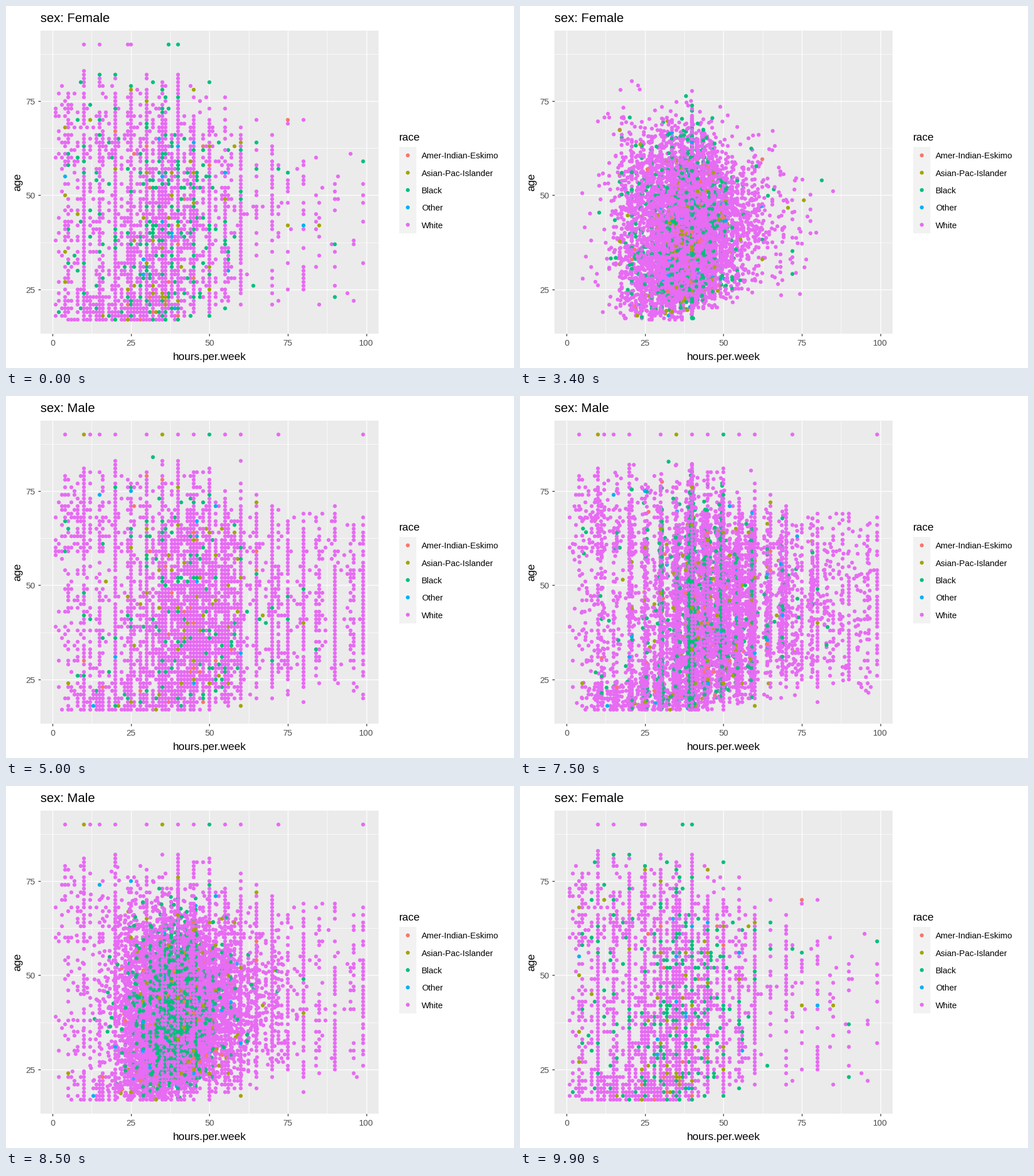
These frames come from a looping animation (885x632 px, 10 s). A matplotlib script:

```python
import matplotlib.pyplot as plt
import numpy as np
from matplotlib.animation import FuncAnimation
from matplotlib.colors import to_rgb
from matplotlib.patches import Rectangle

W, H, DPI = 885, 632, 100
FRAMES, INTERVAL = 100, 100
STEPS = 25
PT = 72 / DPI

RACES = ["Amer-Indian-Eskimo", "Asian-Pac-Islander", "Black", "Other", "White"]
COLORS = ["#F8766D", "#A3A500", "#00BF7D", "#00B0F6", "#E76BF3"]
RGB = np.array([to_rgb(c) for c in COLORS])
ASIAN, BLACK, WHITE = 1, 2, 4

# Panel edges in pixels
LEFT, RIGHT, TOP, BOTTOM = 60.2, 649.4, 43.2, 571.6
DOT = 6.8

# Weekly hours of the people at the top age
TOP_AGE = 90
FEMALE_TOP = {BLACK: [37, 40], WHITE: [10, 15, 24, 25]}
MALE_TOP = {ASIAN: [10, 35], BLACK: [50],
            WHITE: [4, 12, 15, 20, 45, 60, 72, 40, 30, 55, 99]}

rng = np.random.default_rng(11)


def px(hours):
    return 81.1 + 5.465 * np.asarray(hours)


def py(age):
    return 659.45 - 6.58 * np.asarray(age)


def hour_weights(hours):
    """Round numbers are popular, above all 40, and less so away from it."""
    near = np.exp(-np.abs(hours - 40) / 12)
    long_week = hours > 60
    return np.select(
        [hours == 40, hours == 99, hours % 10 == 0, hours % 5 == 0,
         long_week & (hours % 12 == 0), long_week,
         hours % 4 == 0, hours % 2 == 0],
        [15000, 85, 5500 * near, 2100 * near,
         50, 2 + 60 * near,
         60 + 350 * near, 25 + 200 * near],
        15 + 70 * near)


def sample_hours(race, female):
    hours = np.arange(1, 100)
    share = .14 + .45 / (1 + np.exp((hours - 39.5) / 2))
    weight = hour_weights(hours) * (share if female else 1 - share)
    usual = weight * np.exp(-np.abs(hours - 40) / 28)
    n = len(race)
    return np.where(race == WHITE,
                    rng.choice(hours, n, p=weight / weight.sum()),
                    rng.choice(hours, n, p=usual / usual.sum()))


def sample_ages(hours, female):
    """Short weeks are worked by the young and the old, long ones mid-life."""
    n = len(hours)
    old = (.5 if female else .6) * np.exp(-hours / 16) + .01
    young = .42 * np.exp(-((hours - 20) / 14) ** 2)
    a = 1.55 + .028 * np.clip(hours - 36, 0, 30)
    mid_age = 18 + 57 * rng.beta(a, 2.5)
    old_age = 59 + 26 * rng.beta(1, 2.2, n)
    young_age = 17 + 9 * rng.beta(1, 1.8, n)
    u = rng.random(n)
    return np.floor(np.select([u < old, u < old + young],
                              [old_age, young_age], mid_age))


def make_people(counts, top, female):
    race = rng.permutation(np.repeat(np.arange(5), counts))
    hours = sample_hours(race, female)
    pos = np.column_stack([hours, sample_ages(hours, female)])
    for r, top_hours in top.items():
        extra = [(h, TOP_AGE) for h in top_hours]
        pos = np.vstack([pos, extra])
        race = np.append(race, np.full(len(extra), r))
    return pos, race


def pair_up(race_a, race_b):
    """Index in b of the k-th person of the same race, or -1."""
    partner = np.full(len(race_a), -1)
    for r in range(5):
        ia, ib = np.flatnonzero(race_a == r), np.flatnonzero(race_b == r)
        n = min(len(ia), len(ib))
        partner[ia[:n]] = ib[:n]
    return partner


F_POS, F_RACE = make_people([119, 346, 1553, 109, 8638], FEMALE_TOP, True)
M_POS, M_RACE = make_people([192, 691, 1568, 162, 19163], MALE_TOP, False)
F_TO_M = pair_up(F_RACE, M_RACE)
M_TO_F = pair_up(M_RACE, F_RACE)


def top_only(pos, race):
    """Drop points fully hidden by a later one at the same place."""
    key = pos[::-1, 0] + 1j * pos[::-1, 1]
    first = np.unique(key.round(4), return_index=True)[1]
    keep = np.sort(len(pos) - 1 - first)
    return pos[keep], race[keep]


def move(pos, race, partner, goal, t):
    """Paired people glide to their partner's place; the rest wait."""
    end = np.where((partner >= 0)[:, None], goal[partner], pos)
    return top_only(pos + t * (end - pos), race)


F_STILL = top_only(F_POS, F_RACE)
M_STILL = top_only(M_POS, M_RACE)


def people_at(n):
    if 26 <= n < 50:
        return move(F_POS, F_RACE, F_TO_M, M_POS, (n - 25) / STEPS)
    if 50 <= n < 75:
        return M_STILL
    if 75 <= n < 99:
        return move(M_POS, M_RACE, M_TO_F, F_POS, (n - 74) / STEPS)
    return F_STILL


plt.rcParams["font.family"] = "Liberation Sans"
fig = plt.figure(figsize=(W / DPI, H / DPI), dpi=DPI, facecolor="white")
ax = fig.add_axes([0, 0, 1, 1])
ax.set_xlim(0, W)
ax.set_ylim(H, 0)
ax.axis("off")


def label(x, y, s, size, color="black", **kw):
    return ax.text(x, y, s, fontsize=size * PT, color=color,
                   va="baseline", **kw)


def line(xs, ys, width, color="white"):
    ax.plot(xs, ys, color=color, lw=width * PT, solid_capstyle="butt",
            zorder=2)


def box(x, y, w, h, color):
    ax.add_patch(Rectangle((x, y), w, h, facecolor=color, lw=0, zorder=1))


box(LEFT, TOP, RIGHT - LEFT, BOTTOM - TOP, "#EBEBEB")
for v in np.arange(12.5, 100, 25):
    line([px(v)] * 2, [TOP, BOTTOM], .7)
    if v > 20:
        line([LEFT, RIGHT], [py(v)] * 2, .7)
for v in range(0, 101, 25):
    line([px(v)] * 2, [TOP, BOTTOM], 1.35)
    line([px(v)] * 2, [BOTTOM, BOTTOM + 4.6], 1.35, "#333333")
    label(px(v), 593.3, str(v), 14.9, "#4D4D4D", ha="center")
for v in range(25, 76, 25):
    line([LEFT, RIGHT], [py(v)] * 2, 1.35)
    line([LEFT - 4.6, LEFT], [py(v)] * 2, 1.35, "#333333")
    label(51, py(v) + 5.6, str(v), 14.9, "#4D4D4D", ha="right")

label(354.5, 618.5, "hours.per.week", 18.9, ha="center")
label(25, 307, "age", 18.9, ha="center", rotation=90,
      rotation_mode="anchor")
title = label(60, 28.5, "sex: Female", 22.2)

KEY = 30.3
label(685, 235, "race", 18.9)
box(685, 245.6, KEY, 5 * KEY, "#F2F2F2")
key_y = 245.6 + KEY * (np.arange(5) + .5)
for y, name in zip(key_y, RACES):
    label(724, y + 5.6, name, 14.8)

SIZE = (DOT * PT) ** 2
ax.scatter(np.full(5, 700), key_y, s=SIZE, c=COLORS, lw=0, zorder=3)
dots = ax.scatter([], [], s=SIZE, lw=0, zorder=3)


def update(n):
    pos, race = people_at(n)
    dots.set_offsets(np.column_stack([px(pos[:, 0]), py(pos[:, 1])]))
    dots.set_facecolor(RGB[race])
    title.set_text("sex: Male" if 37 <= n < 86 else "sex: Female")
    return dots, title


anim = FuncAnimation(fig, update, frames=FRAMES, interval=INTERVAL,
                     init_func=lambda: update(0), repeat=True,
                     repeat_delay=0, cache_frame_data=False)
plt.show()
```
